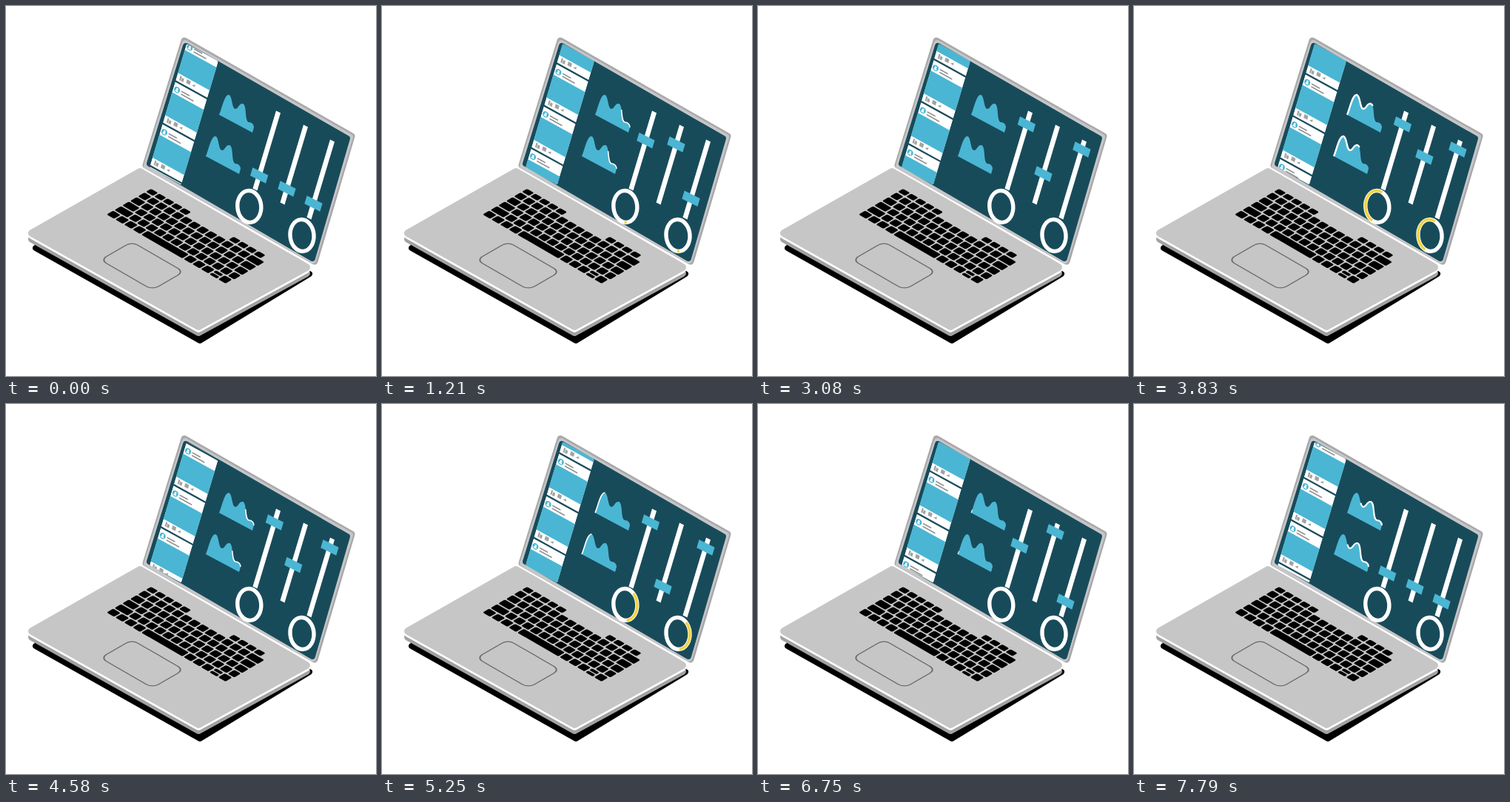
Write an HTML page that moves like this. It is 500 by 500 pixels and loops after 7.83 s.

```html
<!DOCTYPE html>
<html lang="en">
<head>
<meta charset="utf-8">
<title>Laptop dashboard</title>
<style>
html, body { margin: 0; width: 100%; height: 100%; overflow: hidden; background: #fff }
svg { display: block; width: 100%; height: 100% }
.round { stroke-linejoin: round }
</style>
</head>
<body>
<svg viewBox="0 0 500 500">
  <defs>
    <path id="base" class="round" d="M35 310L181 227L406 356L260 436Z" stroke-width="10"/>
    <path id="area" d="M288 147C292 138 295 120 301 120C306 121 305 139 310 139C314 139 315 131 320 132C326 134 322 155 328 157C332 157 335 160 335 164L333 171Z"/>
    <path id="crest" pathLength="1" d="M288 147C292 138 295 120 301 120C306 121 305 139 310 139C314 139 315 131 320 132C326 134 322 155 328 157C332 157 335 160 335 164"/>
    <path id="arc" pathLength="1" d="M0 21.5A16 21.5 0 1 1 0 -21.5A16 21.5 0 1 1 0 21.5"/>
    <g id="card">
      <rect y="-8" width="43" height="55" fill="#fff"/>
      <rect y="6" width="43" height="31" fill="#4ab6d3"/>
      <circle cx="5" r="3.8" fill="#4ab6d3"/>
      <path d="M3 2.5a2 2.6 0 0 1 4 0z" fill="#fff"/>
      <circle cx="5" cy="-1" r="1.3" fill="#fff"/>
      <path d="M10.500 -1h11M11 2.500h17" stroke="#8c8c8c" stroke-width="1.500"/>
      <path d="M4 38.500h2v6h-2zM6.500 40h3v4.500h-3zM13 38.500h5v5h-5zM20.500 42.500l4 -3v3.500z" fill="#a3a3a3"/>
    </g>
    <clipPath id="panel"><rect width="43" height="167" rx="2"/></clipPath>
  </defs>

  <path class="round" d="M40 327L185 244L410 362L262 452Z" stroke="#000" stroke-width="8"/>
  <use href="#base" y="5" fill="#a2a2a2" stroke="#a2a2a2"/>
  <use href="#base" fill="#fff" stroke="#fff"/>
  <use href="#base" y="-3" fill="#c6c6c6" stroke="#c6c6c6"/>
  <g id="keys" transform="matrix(.866 .502 -.866 .502 196 247)"></g>
  <rect transform="matrix(.866 .5 -.866 .5 184 351)" x="-40.500" y="-24.500" width="81" height="49" rx="9" fill="none" stroke="#6b6b6b" stroke-width="1.500"/>

  <path class="round" d="M241 47L467 176L417 345L189 215Z" fill="#a8a8aa" stroke="#a8a8aa" stroke-width="9"/>
  <path class="round" d="M242 50L465 177L415 344L190 216Z" fill="#c6c6c8" stroke="#c6c6c8" stroke-width="8"/>
  <path class="round" d="M243 54L461 179L414 341L194 213Z" fill="#184b5a" stroke="#184b5a" stroke-width="8"/>

  <g transform="matrix(1 .55 -.3 1 244 51)"><g clip-path="url(#panel)"><g id="feed"></g></g></g>
  <g id="charts"></g>
  <g id="sliders"></g>
  <g id="rings" fill="none"></g>
</svg>
<script>
const LOOP = 7830, CARD = 57.2;
const $ = id => document.getElementById(id);
const clamp = x => Math.max(0, Math.min(1, x));
const ease = u => (1 - Math.cos(Math.PI * clamp(u))) / 2;

function add(parent, tag, attrs) {
  const el = document.createElementNS('http://www.w3.org/2000/svg', tag);
  for (const k in attrs) el.setAttribute(k, attrs[k]);
  return parent.appendChild(el);
}

function trim(el, from, to) {
  el.setAttribute('stroke-dasharray', `0 ${from} ${Math.max(0, to - from)} 2`);
}

// Keyboard: a split row of half keys, four staggered rows, the space bar row
const key = (x, y, width, height = 10.3) =>
  add($('keys'), 'rect', { x, y, width, height, rx: 2 });
const PITCH = 12.9, END = 187;
for (let i = 0; i < 14; i++) if (i < 5 || i > 9) key(i * PITCH, 0, 11, 8);
for (let row = 1; row < 5; row++) {
  const y = row * 12.2 - 2;
  let x = 10 + row * 3;
  key(0, y, x - 2);
  for (; x < END - 22; x += PITCH) key(x, y, 11);
  key(x, y, END - x);
}
for (let i = 0; i < 4; i++) key(i * 13.5, 59, 11.5);
key(54, 59, 64);
for (let i = 0; i < 5; i++) {
  const x = 120 + i * 13.5;
  if (i == 3) { key(x, 59, 11.5, 4.5); key(x, 65, 11.5, 4.5); }
  else key(x, 59, 11.5);
}

// Screen contents
for (let i = -1; i < 4; i++) add($('feed'), 'use', { href: '#card', y: i * CARD + 2.3 });

const crests = [[0, 0], [-18, 56]].map(([x, y]) => {
  const g = add($('charts'), 'g', { transform: `translate(${x} ${y})` });
  add(g, 'use', { href: '#area', fill: '#4ab6d3' });
  return add(g, 'use', { href: '#crest', fill: 'none', stroke: '#fff' });
});

// moves: start and end times of alternating rises and falls
const sliders = [
  { x: 368, y: 143, low: 229, high: 160, moves: [[0, 1950], [5900, 7700]] },
  { x: 405, y: 162, low: 247, high: 173, moves: [[0, 1700], [2300, 3500], [3500, 4100], [4100, 4950], [5200, 6700], [6900, 7750]] },
  { x: 441, y: 182, low: 267, high: 194, moves: [[0, 650], [650, 1350], [1350, 1600], [1600, 2000], [2000, 2700], [5880, 6330]] }
];
for (const s of sliders) {
  add($('sliders'), 'rect', {
    x: -3, width: 6, height: 105, fill: '#fff',
    transform: `matrix(1 .5 -.3 1 ${s.x} ${s.y})`
  });
  s.handle = add($('sliders'), 'rect', { x: -10.5, y: -5.5, width: 21, height: 11, fill: '#4ab6d3' });
}

const arcs = [[328.8, 271], [400, 310]].map(([x, y]) => {
  const g = add($('rings'), 'g', { transform: `translate(${x} ${y}) rotate(-5)` });
  add(g, 'ellipse', { rx: 16, ry: 21.5, fill: '#184b5a', stroke: '#fff', 'stroke-width': 5.4 });
  return add(g, 'use', { href: '#arc', stroke: '#f2d43c', 'stroke-width': 3.5 });
});

function draw(now) {
  const t = now % LOOP, p = t / LOOP;

  // The feed runs through about three cards, slowing towards the end
  const cards = 2.97 * (p + p * (1 - p) * (.23 + .55 * p));
  $('feed').setAttribute('transform', `translate(0 ${cards % 1 * CARD})`);

  for (const s of sliders) {
    const lift = s.moves.reduce((sum, [from, to], i) =>
      sum + (i % 2 ? -1 : 1) * ease((t - from) / (to - from)), 0);
    const y = s.low + (s.high - s.low) * lift;
    s.handle.setAttribute('transform', `matrix(1 .5 -.3 1 ${s.x - .3 * (y - s.y)} ${y})`);
  }

  const wave = t % 1680, head = clamp(wave / 700), tail = clamp((wave - 850) / 500);
  for (const c of crests) {
    trim(c, tail, head);
    c.setAttribute('stroke-width', 1 + 2 * (head - tail));
  }

  const spin = t < 6000 ? t % 1200 : 1200;
  for (const a of arcs) trim(a, clamp((spin - 200) / 400), clamp(spin / 400));
}

const start = performance.now();
function frame() {
  draw(performance.now() - start);
  requestAnimationFrame(frame);
}
frame();
</script>
</body>
</html>
```
